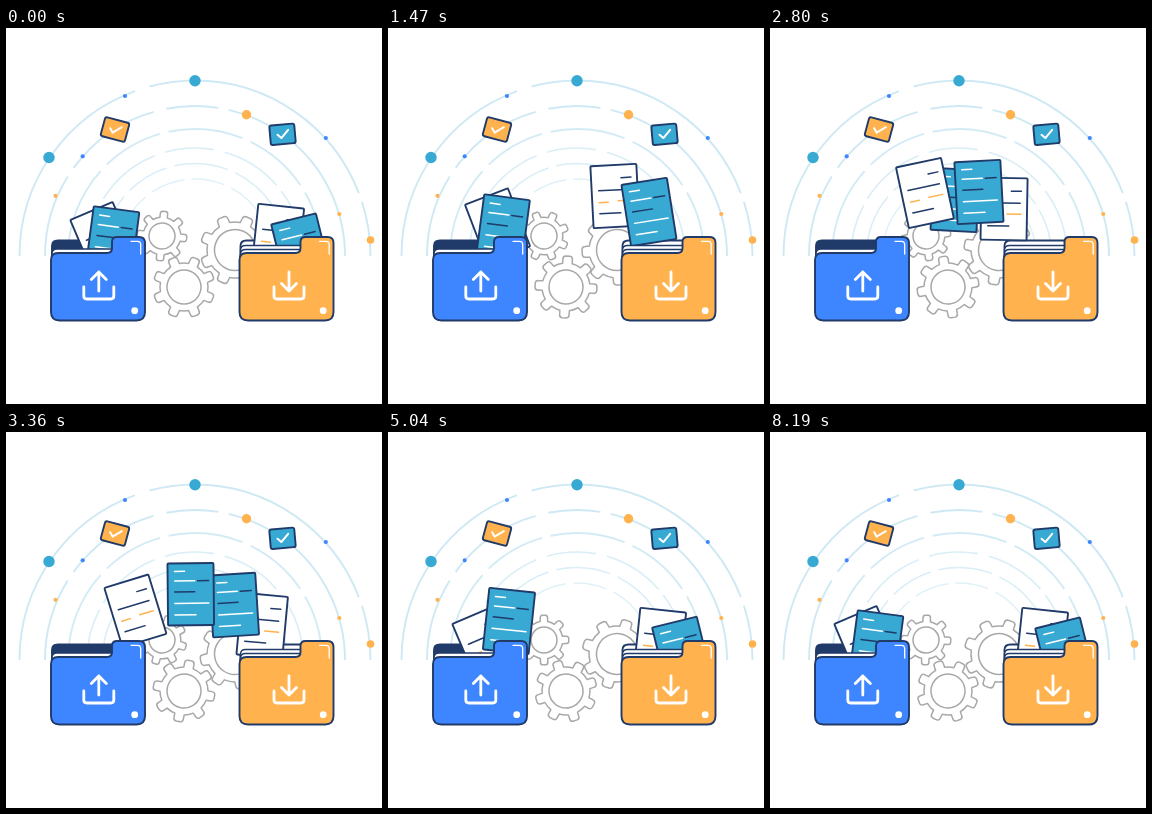
Recreate the animation shown at these times as an HTML page. Size 376 px wide and 376 px high, loop 8.26 s.

```html
<!DOCTYPE html>
<html lang="en">
<head>
<meta charset="utf-8">
<title>File transfer</title>
<style>
html, body { margin: 0; width: 100%; height: 100%; overflow: hidden; background: #fff; }
svg { display: block; width: 100%; height: 100%; stroke-linecap: round; stroke-linejoin: round; }
.edge { stroke: #203a69; stroke-width: 1.9; }
.line { fill: none; stroke: #fff; }
</style>
</head>
<body>
<svg id="stage" viewBox="0 0 376 376"></svg>
<script>
const LOOP = 8260;
const NAVY = '#203a69', TEAL = '#38a9d3', ORANGE = '#ffb24d', BLUE = '#3d86ff';
const stage = document.getElementById('stage');

function add(tag, attrs, parent = stage) {
  const el = document.createElementNS('http://www.w3.org/2000/svg', tag);
  for (const k in attrs) el.setAttribute(k, attrs[k]);
  parent.append(el);
  return el;
}
const dot = (cx, cy, r, fill) => add('circle', { cx, cy, r, fill });
const place = (el, x, y, a) => el.setAttribute('transform', `translate(${x} ${y}) rotate(${a})`);

// Broken arcs; dash lengths are degrees from the left end
function arc(r, width, stroke, dashes) {
  add('path', {
    d: `M${189 - r} 228A${r} ${r} 0 0 1 ${189 + r} 228`, fill: 'none', stroke,
    'stroke-width': width, pathLength: 180, 'stroke-dasharray': dashes, 'stroke-linecap': 'butt'
  });
}
arc(175.5, 1.9, '#cfe9f4', '70 5 84 3 40 0');
arc(150, 1.9, '#cfe9f4', '32 4 38 5 20 4 21 4 60 0');
arc(127, 1.9, '#d3ebf5', '42 4 28 4 34 4 30 4 60 0');
arc(108, 1.6, '#d9eef6', '28 4 36 6 26 6 33 4 60 0');
arc(92.5, 1.5, '#d9eef6', '40 5 27 5 34 5 30 4 60 0');
arc(77, 1.4, '#dff1f8', '50 6 26 5 25 6 70 0');

dot(189, 52.8, 5.7, TEAL);
dot(43, 129.5, 5.7, TEAL);
dot(240.5, 86.7, 4.7, ORANGE);
dot(364.5, 212, 3.8, ORANGE);
for (const [x, y] of [[119, 68], [76.7, 128.3], [319.8, 110]]) dot(x, y, 2.1, BLUE);
for (const [x, y] of [[49.5, 167.8], [333.3, 186]]) dot(x, y, 2.1, ORANGE);

function badge(x, y, angle, fill) {
  const g = add('g');
  place(g, x, y, angle);
  add('rect', { x: -12.5, y: -9.8, width: 25, height: 19.6, rx: 2, fill, class: 'edge' }, g);
  add('path', { d: 'M-5 0L-1.5 3.6L6 -4', class: 'line', 'stroke-width': 2 }, g);
}
badge(109, 101.5, 15, ORANGE);
badge(276.5, 106.3, -5, TEAL);

const TEETH = 8;
function gear(x, y, tip, root, hole, phase, dir) {
  const g = add('g', { fill: '#fff', stroke: '#a8a8a8', 'stroke-width': 1.5 });
  const at = (r, a) => `${r * Math.sin(a)} ${-r * Math.cos(a)}`;
  let d = '';
  for (let i = 0; i < TEETH; i++) {
    const a = i * 2 * Math.PI / TEETH;
    d += `${i ? `A${root} ${root} 0 0 1 ` : 'M'}${at(root, a - .2)}L${at(tip - 3, a - .17)}` +
      `Q${at(tip, a - .16)} ${at(tip, a - .07)}L${at(tip, a + .07)}` +
      `Q${at(tip, a + .16)} ${at(tip - 3, a + .17)}L${at(root, a + .2)}`;
  }
  add('path', { d: d + `A${root} ${root} 0 0 1 ${at(root, -.2)}Z` }, g);
  add('circle', { r: hole }, g);
  return p => place(g, x, y, phase + dir * 360 * p);
}
const gears = [
  gear(229, 222, 35, 28, 20.5, 22.5, 1),
  gear(156, 208, 24.8, 18.8, 13, 5, 1),
  gear(178, 259, 31, 24, 17, 22.5, -1)
];

function folderBack(dx) {
  add('path', {
    d: `M${46 + dx} 250V218Q${46 + dx} 212.5 ${52 + dx} 212.5H${112 + dx}V250Z`,
    fill: dx ? '#fff' : NAVY, class: 'edge'
  });
}
folderBack(0);
folderBack(188.5);

// Ruled lines on each sheet: x1, x2, y, colour
const RULES = {
  white: [[7, 17, -18, NAVY], [-16, 16, -6, NAVY], [-16, -7, 6, ORANGE], [3, 17, 5, ORANGE], [-16, 5, 17, NAVY]],
  teal: [[-16, -6, -23, '#fff'], [-16, 4, -13.5, '#fff'], [7, 18, -13.5, NAVY],
    [-16, 4, -2.5, NAVY], [-16, 18, 9, '#fff'], [-16, 5, 20.5, '#fff']]
};
function sheet(kind, keys) {
  const g = add('g');
  add('rect', {
    x: -23, y: -31, width: 46, height: 62, rx: 1, class: 'edge',
    fill: kind === 'teal' ? TEAL : '#fff'
  }, g);
  for (const [x1, x2, y, stroke] of RULES[kind])
    add('path', { d: `M${x1} ${y}H${x2}`, stroke, 'stroke-width': 1.5 }, g);
  return t => place(g, ...pose(keys, t));
}

// Smooth curve through keys of [time, x, y, angle], at rest at both ends
function pose(keys, t) {
  const last = keys.length - 1;
  if (t <= keys[0][0]) return keys[0].slice(1);
  if (t >= keys[last][0]) return keys[last].slice(1);
  const i = keys.findIndex(k => k[0] > t) - 1;
  const a = keys[i], b = keys[i + 1], span = b[0] - a[0], u = (t - a[0]) / span;
  const slope = (j, c) => j === 0 || j === last ? 0 :
    (keys[j + 1][c] - keys[j - 1][c]) / (keys[j + 1][0] - keys[j - 1][0]);
  return [1, 2, 3].map(c => {
    const m = slope(i, c) * span, n = slope(i + 1, c) * span, gap = b[c] - a[c];
    return a[c] + u * (m + u * (3 * gap - 2 * m - n + u * (m + n - 2 * gap)));
  });
}

const LEFT_WHITE = [97.5, 211.5, -23], LEFT_TEAL = [106.5, 212, 7.5];
const RIGHT_WHITE = [272, 209, 6], RIGHT_TEAL = [295, 221, -14];
const sheets = [
  sheet('white', [[600, ...LEFT_WHITE], [1470, 109.5, 197.5, -21], [2150, 170, 167, -9],
    [2800, 234, 181, 1], [3990, 270, 206, 8], [4700, ...RIGHT_WHITE]]),
  sheet('teal', [[700, ...LEFT_TEAL], [1470, 115, 200, 7.5], [2800, 185, 172, 3],
    [3400, 231, 174, -4], [3990, 269.5, 203.5, -10], [5300, ...RIGHT_TEAL]]),
  sheet('white', [[150, ...RIGHT_WHITE], [1470, 227, 168, -3], [2800, 155, 165, -12],
    [3990, 107, 198, -22], [4900, ...LEFT_WHITE]]),
  sheet('teal', [[350, ...RIGHT_TEAL], [1470, 261, 184, -9], [2800, 209, 164, -3],
    [3990, 158, 166, 2], [5040, 121, 189, 6], [6000, ...LEFT_TEAL]])
];

function folderFront(dx, fill, iconX, arrow) {
  const g = add('g', { transform: `translate(${dx} 0)` });
  for (const y of dx ? [217.5, 221.5] : [221])
    add('path', { d: `M46 250V${y + 5}Q46 ${y} 51 ${y}H112V250Z`, fill: '#fff', stroke: NAVY, 'stroke-width': 1.4 }, g);
  add('path', {
    d: 'M52 225H101Q106 225 106 220V214Q106 209 111 209H133Q139 209 139 215V284' +
      'Q139 292.5 130.5 292.5H53.5Q45 292.5 45 284V232Q45 225 52 225Z', fill, class: 'edge'
  }, g);
  add('path', { d: 'M125 213.3H131.5Q134.7 213.3 134.7 216.5V226', class: 'line', 'stroke-width': 1.3 }, g);
  add('circle', { cx: 128.7, cy: 282.7, r: 3.4, fill: '#fff' }, g);
  add('path', {
    d: 'M-15 259V268Q-15 271 -12 271H12Q15 271 15 268V259' + arrow,
    transform: `translate(${iconX} 0)`, class: 'line', 'stroke-width': 2.8
  });
}
folderFront(0, BLUE, 92.8, 'M0 263V244M-7.5 251.5L0 244L7.5 251.5');
folderFront(188.5, ORANGE, 283, 'M0 244V263M-7.5 255.5L0 263L7.5 255.5');

function draw(now) {
  const t = now % LOOP;
  gears.forEach(turn => turn(t / LOOP));
  sheets.forEach(move => move(t));
}
const start = performance.now();
function tick() {
  draw(performance.now() - start);
  requestAnimationFrame(tick);
}
tick();
</script>
</body>
</html>
```
